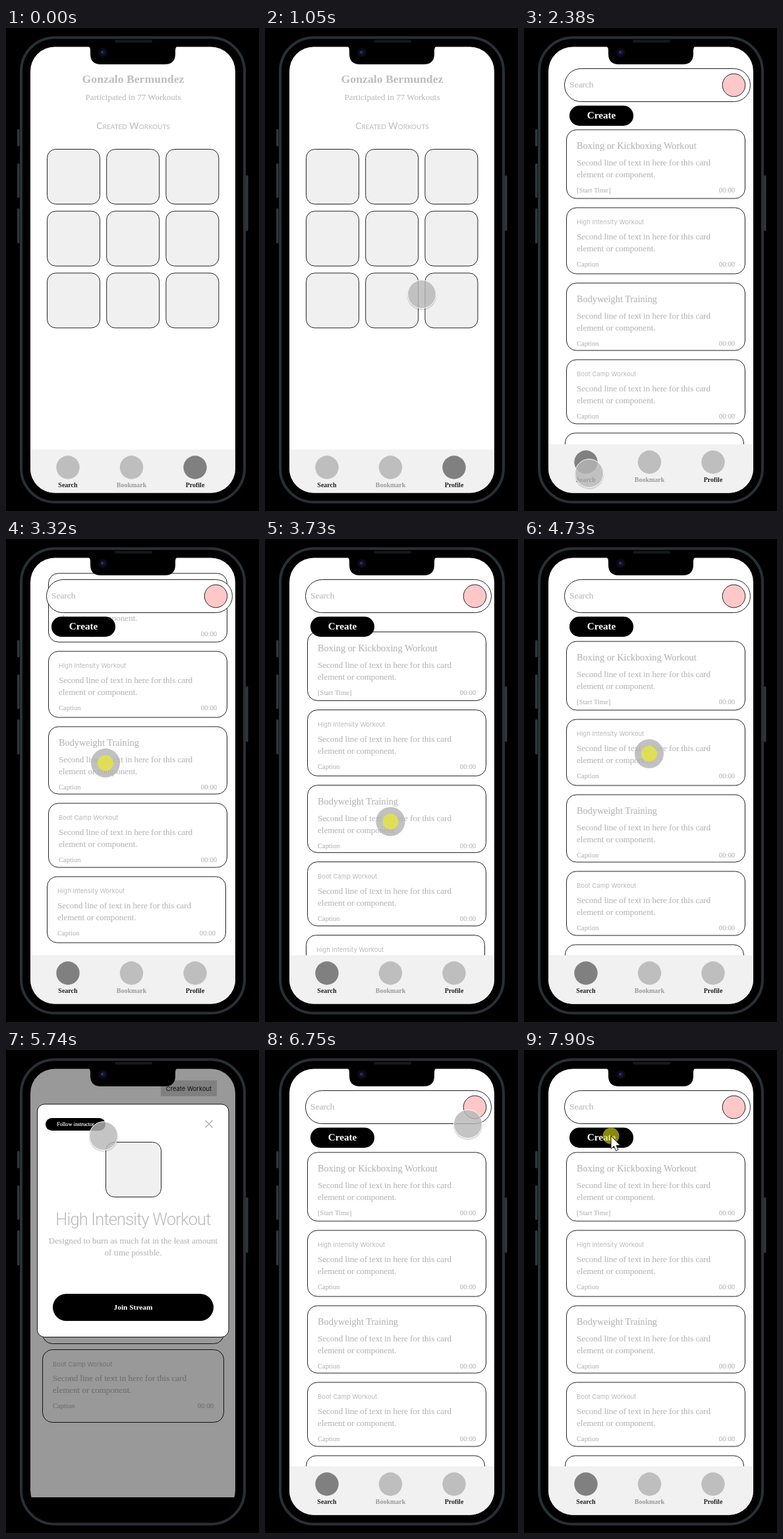
These frames come from a looping animation (384 by 731 pixels, 8000 ms). An HTML page:

```html
<!DOCTYPE html>
<html lang="en">
<head>
<meta charset="utf-8">
<title>Workout app prototype</title>
<style>
  html, body { margin: 0; height: 100%; overflow: hidden; background: #000; }
  svg { display: block; width: 384px; height: 731px; }
  text { font-family: "Liberation Serif", serif; fill: currentColor; stroke: currentColor; stroke-width: .15; }
  .bold { font-weight: bold; stroke: none; }
  .sans { font-family: Inter, sans-serif; stroke: none; }
  .caps { font-family: Lato, sans-serif; font-variant: small-caps; stroke: none; }
  .thin { font-family: Roboto, sans-serif; font-weight: 300; letter-spacing: -.8px; stroke: none; }
</style>
</head>
<body>
<svg id="stage" viewBox="0 0 384 731"></svg>
<script>
const GREY = '#b9b9b9', PALE = '#f0f0f0', MID = '#bebebe', DARK = '#808080', LINE = '#222';
const LOOP = 8000, START = 100, SEARCH = 2380, DRAG = 2970, RELEASE = 4070;
const TAP = 4730, MODAL = 4780, CLOSE = 6750, ARROW = 7700;
const REST = 1, SETTLE = 400;

// Pointer stops: arrival, x, y and how long it rests there
const stops = [
  [START, 300, 655, 0], [1050, 238, 403, 0], [2060, 99, 674, 320], [2720, 150, 441, 250],
  [3320, 151, 339, 0], [RELEASE, 220, 494, 0], [4540, 190, 325, 790], [5740, 148, 130, 260],
  [6600, 308, 112, 240], [7900, 132, 130, 100]
];

const rect = (x, y, w, h, r, fill, stroke = 'none', width = 1) =>
  `<rect x="${x}" y="${y}" width="${w}" height="${h}" rx="${r}" fill="${fill}" stroke="${stroke}" stroke-width="${width}"/>`;
const circle = (x, y, r, fill, stroke = 'none') =>
  `<circle cx="${x}" cy="${y}" r="${r}" fill="${fill}" stroke="${stroke}"/>`;
const text = (s, x, y, size, color = GREY, anchor = 'start', cls = '') =>
  `<text x="${x}" y="${y}" font-size="${size}" color="${color}" text-anchor="${anchor}" class="${cls}">${s}</text>`;
const middle = (s, y, size, color, cls) => text(s, 193, y, size, color, 'middle', cls);
const group = (id, body) => `<g id="${id}">${body}</g>`;

function nav(y, active) {
  const labels = ['Search', 'Bookmark', 'Profile'];
  return rect(37, y, 312, 80, 0, '#f1f1f1') + labels.map((s, i) => {
    const x = 94 + i * 96.5;
    return circle(x, y + 27, 17.7, i === active ? DARK : MID) +
      text(s, x, y + 57, 10, i === 1 ? '#999' : '#222', 'middle', 'bold');
  }).join('');
}

function cardText(x, y, caption, color, right) {
  return text('Second line of text in here for this card', x, y, 13, color) +
    text('element or component.', x, y + 18, 13, color) +
    text(caption, x, y + 41, 10.6, color) +
    text('00:00', right, y + 41, 10.6, color, 'end');
}

function card(x, y, h, title, serif, caption = 'Caption') {
  return rect(x + .5, y, 271, h, 15, '#fff', LINE) +
    (serif ? text(title, x + 16, y + 29, 14.3) : text(title, x + 16, y + 25, 9.5, GREY, 'start', 'sans')) +
    cardText(x + 16, y + (serif ? 54 : 48), caption, GREY, x + 256);
}

function profile() {
  let s = rect(37, 28, 312, 676, 0, '#fff') +
    middle('Gonzalo Bermundez', 83, 17.7, MID, 'bold') +
    middle('Participated in 77 Workouts', 109, 13, MID) +
    middle('Created Workouts', 153, 13.9, GREY, 'caps');
  for (let i = 0; i < 9; i++)
    s += rect(62.5 + i % 3 * 90.2, 183.5 + Math.floor(i / 3) * 93.7, 80, 83, 13, PALE, LINE);
  return s + nav(638, 2);
}

function search() {
  let y = 154;
  const add = (h, ...rest) => {
    const s = card(64, y, h, ...rest);
    y += h + 14;
    return s;
  };
  const cards = add(104, 'Boxing or Kickboxing Workout', true, '[Start Time]') +
    add(100, 'High Intensity Workout') +
    add(102, 'Bodyweight Training', true) +
    add(97, 'Boot Camp Workout') +
    card(62, y, 100, 'High Intensity Workout');
  return rect(37, 28, 312, 676, 0, '#fff') + group('cards', cards) +
    rect(61.5, 61.5, 282, 50, 25, '#fff', LINE) +
    text('Search', 69, 90, 13.4) +
    circle(318.5, 86.5, 17.3, '#ffc8c8', LINE) +
    rect(69, 117.5, 97, 30.5, 15, '#000') +
    text('Create', 117.5, 137, 15.2, '#fff', 'middle', 'bold') +
    nav(630, 0);
}

function modal() {
  const dim = '#707070';
  return rect(37, 28, 312, 649, 0, '#999') + rect(37, 677, 312, 30, 0, '#000') +
    rect(235, 46, 85, 24, 0, '#808080') +
    text('Create Workout', 277.5, 62, 9.4, '#111', 'middle', 'sans') +
    rect(55.5, 340.5, 275, 104, 15, 'none', '#111') +
    rect(55.5, 453.5, 275, 110, 15, 'none', '#111') +
    text('Boot Camp Workout', 71, 478.5, 9.5, dim, 'start', 'sans') +
    cardText(71, 501, 'Caption', dim, 315) +
    rect(47.5, 82, 290.5, 352.5, 11, '#fff', '#111') +
    rect(60, 103, 91, 19, 9.5, '#000') +
    text('Follow instructor', 105.5, 115, 8.2, '#fff', 'middle') +
    '<path d="M302.5 106.5l11 11m0-11l-11 11" stroke="#b4b4b4" stroke-width="1.6"/>' +
    rect(151.5, 139.5, 84, 83, 13, PALE, LINE) +
    middle('High Intensity Workout', 265, 25.4, GREY, 'thin') +
    middle('Designed to burn as much fat in the least amount', 293, 13.1) +
    middle('of time possible.', 311, 13.1) +
    rect(71, 369, 244, 41, 20.5, '#000') +
    middle('Join Stream', 393, 11.4, '#fff', 'bold');
}

function phone() {
  const button = (x, y, h) => rect(x, y, 3.5, h, 1.5, '#30363a');
  return button(17, 153, 26) + button(17, 205, 52) + button(17, 273, 53) + button(364, 223, 84) +
    rect(23, 14.5, 339, 703, 51, '#000', '#283034', 4);
}

const notch = () =>
  '<path d="M122 27q6 0 6 7v5q0 16 16 16h97q16 0 16-16v-5q0-7 6-7z" fill="#000"/>' +
  rect(165, 18, 57, 4, 2, '#161819') +
  circle(147, 37, 7, '#090b14') + circle(147, 37, 3.8, '#101838') + circle(146, 36.5, 1.6, '#2b3f80');

const pointer = () =>
  group('touch', circle(0, 1.5, 22.5, 'rgba(0,0,0,.14)') +
    circle(0, 0, 21.5, 'rgba(190,190,190,.78)', '#fff')) +
  group('press', circle(0, 0, 22, 'rgba(178,178,178,.8)') + circle(0, 0, 12, 'rgba(226,226,72,.88)')) +
  group('arrow', circle(0, 0, 12.5, 'rgba(210,210,20,.65)') +
    '<path d="M0 0v19.5l4.5-4 3 7 3.5-1.5-3-6.5h6z" fill="#fff" stroke="#111"/>');

document.getElementById('stage').innerHTML =
  `<defs><clipPath id="screen">${rect(37, 28.5, 311, 675, 37, '#000')}</clipPath></defs>` + phone() +
  '<g clip-path="url(#screen)">' +
    group('profile', profile()) + group('search', search()) + group('modal', modal()) +
  '</g>' + notch() + group('pointer', pointer());

const el = id => document.getElementById(id);
const show = (id, on) => el(id).setAttribute('display', on ? 'inline' : 'none');
const move = (id, x, y) => el(id).setAttribute('transform', `translate(${x} ${y})`);
const mix = (a, b, k) => a + (b - a) * k;
const within = (t, a, b) => t >= a && t < b;

// Smooth 0 to 1 between two times
function ease(t, from, to) {
  const k = Math.min(1, Math.max(0, (t - from) / (to - from)));
  return k * k * (3 - 2 * k);
}

function pointerAt(t) {
  let [left, x, y] = stops[0];
  for (const [arrive, nx, ny, hold] of stops.slice(1)) {
    const k = ease(t, left, arrive);
    x = mix(x, nx, k);
    y = mix(y, ny, k);
    left = arrive + hold;
  }
  return [x, y];
}

// The list follows the finger, resists past its top, then settles
function scrollAt(t) {
  if (t < DRAG) return 0;
  const pulled = pointerAt(Math.min(t, RELEASE))[1] - pointerAt(DRAG)[1];
  const offset = pulled > 0 ? pulled * .95 : pulled;
  return mix(offset, REST, ease(t, RELEASE, RELEASE + SETTLE));
}

function draw() {
  const t = performance.now() % LOOP;
  const open = within(t, MODAL, CLOSE);
  const arrow = t >= ARROW;
  const pressed = within(t, DRAG, RELEASE) || within(t, TAP, MODAL) || within(t, CLOSE - 50, CLOSE);
  show('profile', t < SEARCH);
  show('search', t >= SEARCH && !open);
  show('modal', open);
  show('pointer', t >= START);
  show('touch', !pressed && !arrow);
  show('press', pressed);
  show('arrow', arrow);
  move('cards', 0, scrollAt(t));
  move('pointer', ...pointerAt(t));
  requestAnimationFrame(draw);
}
draw();
</script>
</body>
</html>
```
